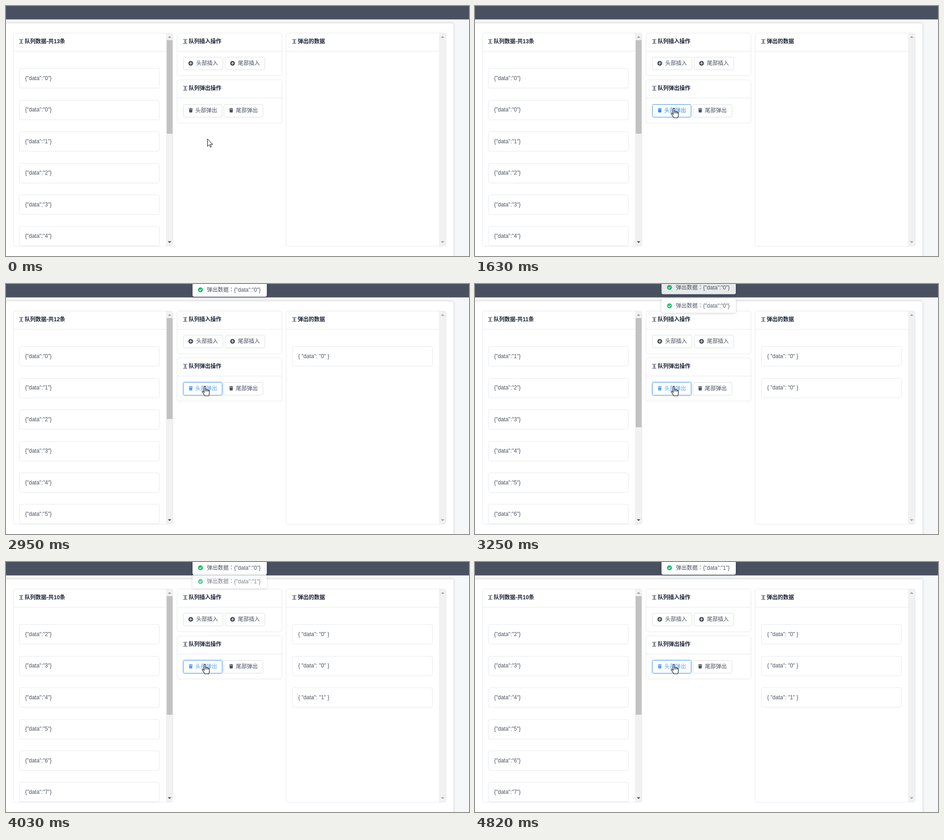
Recreate the animation shown at these times as an HTML page. Size 1019 by 550 pixels, loop 5.28 s.

```html
<!DOCTYPE html>
<html lang="zh-CN">
<head>
<meta charset="utf-8">
<title>队列操作</title>
<style>
html, body { margin: 0; width: 100%; height: 100%; overflow: hidden; background: #f5f7f9; }
svg { display: block; width: 1019px; height: 550px; }
text { font: 12px "Liberation Sans", "Noto Sans CJK SC", "Noto Sans CJK", sans-serif; fill: #495060; white-space: pre; }
.title { font-weight: 700; fill: #1c2438; }
.colon { font-family: "Noto Sans CJK TC", sans-serif; }
.box { fill: #fff; stroke: #e6e8eb; }
.line { fill: none; stroke: #e6e8eb; }
.btn { fill: #fff; stroke: #dddee1; }
.page { filter: drop-shadow(0 0 2px rgba(0, 0, 0, .22)); }
.toast rect { filter: drop-shadow(0 1px 3px rgba(0, 0, 0, .2)); }
</style>
</head>
<body>
<svg id="stage" viewBox="0 0 1019 550"></svg>
<script>
const LOOP = 5280, ROWS = 6, PITCH = 69.4, TOAST = 43, FADE = 286;

const BURSTS = [[530, 1010, 7], [1080, 1240, 3], [1630, 2010, 6], [2950, 3410, 7],
  [3480, 3480, 1], [3720, 4180, 7], [4500, 4820, 5]];
const POPS = [
  { at: 1690, leave: 3194, value: 0 },
  { at: 3000, leave: 4495, value: 0 },
  { at: 3835, leave: LOOP, value: 1 }
];
const THUMB_END = [281, 297, 315, 336];
const GREY = [73, 80, 96], EDGE = [221, 222, 225], HOVER = [87, 163, 243], ACTIVE = [43, 133, 228];
const PRESSES = [[1560, 1640, 1720, 1900], [2940, 3020, 3050, 3230], [3710, 3800, 3830, 4030]];

const stage = document.getElementById('stage');
const $ = id => document.getElementById(id);

const rect = (cls, x, y, w, h, r = 4) =>
  `<rect class="${cls}" x="${x}" y="${y}" width="${w}" height="${h}" rx="${r}"/>`;
const label = (x, y, s, attrs = '') => `<text x="${x}" y="${y}" ${attrs}>${s}</text>`;

function title(x, y, s, id = '') {
  return `<path d="M${x} ${y - 4.5}h9m-7 3h5m-5 3h5m-7 3h9M${x + 4.5} ${y - 4.5}v9"
    fill="none" stroke="#1c2438" stroke-opacity=".85"/>` +
    label(x + 12, y + 4, s, `class="title" id="${id}"`);
}

const plus = (x, y) => `<circle cx="${x}" cy="${y}" r="5.3" fill="#495060"/>
  <path d="M${x - 3} ${y}h6m-3-3v6" stroke="#fff" stroke-width="1.2"/>`;
const trash = (x, y) => `<path d="M${x - 4.3} ${y - 4}h2.6l.7-1h2l.7 1h2.6v1.5h-8.6z
  M${x - 3.8} ${y - 1.8}h7.6l-.5 5.6q-.1 1-1 1h-4.6q-.9 0-1-1z" fill="#495060"/>`;

const button = (x, y, w, icon, s, textX, id = '') =>
  `<g id="${id}">${rect('btn', x + .5, Math.ceil(y) + .5, w, 28, 3)}` +
  `${icon(x + 16.6, y + 14)}${label(textX, y + 18, s)}</g>`;

const panel = (x, y, w, h, lineW) =>
  rect('box', x + .5, y + .5, w, h) + `<path class="line" d="M${x + 1} ${y + 40.5}h${lineW}"/>`;

const scrollbar = (x, downColor) => `<rect x="${x}" y="60" width="15" height="468" fill="#f1f1f1"/>
  <path d="M${x + 4} 70h8l-4-4z" fill="#a3a3a3"/>
  <path d="M${x + 4} 517.5h8l-4 4z" fill="${downColor}"/>`;

const rows = (n, x, id) => Array.from({ length: n }, (_, i) => {
  const y = 137.4 + i * PITCH;
  return `<g id="${id}${i}">${rect('box', x + .5, Math.round(y) + .5, 308, 43)}` +
    `${label(x + 13, Math.round(y + 25.6), '')}</g>`;
}).join('');

const toast = (p, i) => `<g class="toast" id="toast${i}">
  <rect x="410.5" y="0" width="163.5" height="31" rx="4" fill="#fff"/>
  <circle cx="428" cy="15.7" r="5.4" fill="#19be6b"/>
  <path d="M425.4 15.8l1.9 1.9 3.4-3.6" fill="none" stroke="#fff" stroke-width="1.3"/>
  ${label(442, 20, `弹出数据<tspan class="colon" lang="zh-TW">：</tspan>{"data":"${p.value}"}`)}</g>`;

stage.innerHTML =
  '<rect width="1019" height="550" fill="#f5f7f9"/><rect width="1019" height="29.5" fill="#495060"/>' +
  '<rect class="page" x="-1" y="38" width="986" height="530" rx="4" fill="#fff"/>' +
  panel(16, 59, 351, 469, 335) + title(29, 78, '', 'count') + rows(ROWS, 29, 'item') +
  scrollbar(352, '#505050') + '<rect id="thumb" x="353.7" y="75" width="12.8" fill="#c1c1c1"/>' +
  panel(376, 59, 231, 94, 231) + title(390, 78, '队列插入操作') +
  button(390, 112, 87, plus, '头部插入', 418.5) + button(482, 112, 87, plus, '尾部插入', 510.5) +
  panel(376, 162, 231, 95, 231) + title(390, 181, '队列弹出操作') +
  '<rect id="focus" x="389" y="215" width="88" height="31" rx="4" fill="none" stroke="#2d8cf0" stroke-width="2"/>' +
  button(390, 215.5, 85, trash, '头部弹出', 416.5, 'pop') +
  button(479, 215.5, 86, trash, '尾部弹出', 506) +
  panel(616, 59, 352, 469, 336) + title(630, 78, '弹出的数据') + rows(POPS.length, 630, 'out') +
  scrollbar(953, '#a3a3a3') +
  POPS.map(toast).join('') +
  `<path id="arrow" d="M.5.5V16.8L4.3 13.2 6.9 18.6 9.1 17.6 6.6 12.3H11.8Z" fill="#fff" stroke="#000"/>
  <path id="hand" d="M5 14V2a1.5 1.5 0 0 1 3 0V8a1.5 1.5 0 0 1 3 .5V9a1.5 1.5 0 0 1 3 .6V10.2
    a1.4 1.4 0 0 1 2.6 .8V15.5q0 3-1.8 6H6.5Q4 17 1 13.5q-.8-1.5.4-2.2 1.6-.6 3.6 2.7z
    M8 8v4M11 9v3M14 10.2v2" fill="#fff" stroke="#000" stroke-width="1.1"/>`;

const lerp = (a, b, p) => a + (b - a) * p;
const ramp = (t, a, b) => Math.min(1, Math.max(0, (t - a) / (b - a)));
const ease = p => p * p * (3 - 2 * p);
const mix = (a, b, p) => `rgb(${a.map((v, i) => Math.round(lerp(v, b[i], p)))})`;
const show = (el, on) => el.style.display = on ? '' : 'none';
const place = (el, x, y) => el.setAttribute('transform', `translate(${x} ${y})`);

function snap(t) {
  let s = 0;
  for (const [a, b, n] of BURSTS) {
    if (t < a) break;
    const d = n > 1 ? (b - a) / (n - 1) : 1;
    s = a + d * Math.min(n - 1, Math.floor((t - a + 7) / d));
  }
  return s;
}

function drawLists(t) {
  const n = POPS.filter(p => t >= p.at).length;
  $('count').textContent = `队列数据-共${13 - n}条`;
  $('thumb').setAttribute('height', THUMB_END[n] - 75);
  for (let i = 0; i < ROWS; i++)
    $('item' + i).lastChild.textContent = `{"data":"${Math.max(0, i + n - 1)}"}`;
  POPS.forEach((p, i) => {
    $('out' + i).lastChild.textContent = `{ "data": "${p.value}" }`;
    show($('out' + i), i < n);
  });
}

function drawToasts(t) {
  let top = -9;
  POPS.forEach((p, i) => {
    const el = $('toast' + i);
    const enter = ease(ramp(t, p.at, p.at + 300));
    const leave = ease(ramp(t, p.leave, p.leave + FADE));
    const on = t >= p.at && leave < 1;
    show(el, on);
    if (!on) return;
    const h = TOAST * (1 - leave), seen = enter * (1 - leave);
    place(el, 0, top + 6 * (1 - leave) - (1 - seen) * h);
    el.style.opacity = seen;
    top += h;
  });
}

function drawButton(t) {
  const hover = ramp(t, 1040, 1240);
  const press = Math.max(...PRESSES.map(([a, b, c, d]) => ramp(t, a, b) * (1 - ramp(t, c, d))));
  const tint = base => hover < 1 ? mix(base, HOVER, hover) : mix(HOVER, ACTIVE, press);
  const [edge, icon, text] = $('pop').children;
  edge.style.stroke = tint(EDGE);
  icon.style.fill = text.style.fill = tint(GREY);
  $('focus').style.opacity = .2 * ramp(t, 1640, 1840);
}

function drawCursor(t) {
  const over = t >= 1080;
  show($('arrow'), !over);
  show($('hand'), over);
  const up = ease(ramp(t, 450, 1010)), on = ramp(t, 1010, 1240);
  place($('arrow'), Math.round(lerp(443, 449, up)), Math.round(lerp(292, 243, up)));
  const slide = on * (2 - on);
  place($('hand'), Math.round(lerp(443, 431, slide)), Math.round(lerp(240, 224, slide)) + .5);
}

const start = performance.now();
function frame() {
  const t = snap((performance.now() - start) % LOOP);
  drawLists(t);
  drawToasts(t);
  drawButton(t);
  drawCursor(t);
  requestAnimationFrame(frame);
}
frame();
</script>
</body>
</html>
```
